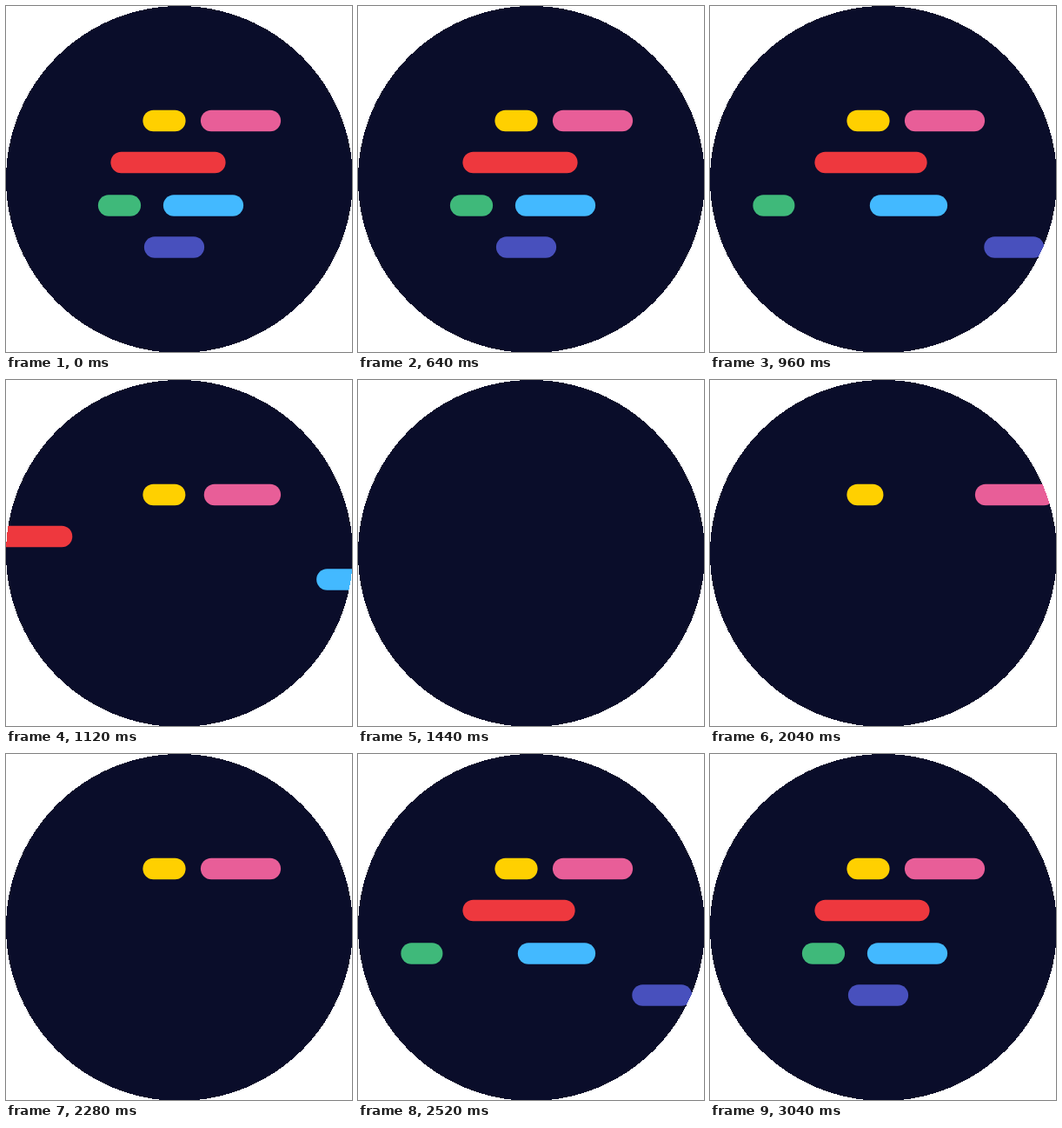
Recreate the animation shown at these times as an HTML page. Size 398x398 px, loop 3080 ms.

```html
<!DOCTYPE html>
<html lang="en">
<head>
<meta charset="utf-8">
<title>Sliding bars</title>
<style>
  html, body { margin: 0; width: 100%; height: 100%; overflow: hidden; background: #fff; }
  svg { display: block; width: 100vw; height: 100vh; }
</style>
</head>
<body>
<svg viewBox="0 0 398 398">
  <rect width="398" height="398" fill="#0a0d2a"/>
  <g id="bars"></g>
  <!-- white surround with a hard-edged round opening -->
  <path d="M-9-9H409V409H-9ZM0 199.5a199.5 199.5 0 0 0 399 0a199.5 199.5 0 0 0-399 0Z"
        fill="#fff" fill-rule="evenodd" shape-rendering="crispEdges"/>
</svg>
<script>
const LOOP = 3080, STEP = 40, MIDDLE = 1640;
const HEIGHT = 24.4, SQUASH = 8, WINDUP = 220, REACH = 176;

// dir: side it leaves by; leave/land: launch and arrival in ms; pace: ms to travel REACH
const bars = [
  { color: '#ffd000', left: 157.4, right: 206.6, y: 132,   dir: -1, leave: 1235, land: 2035, pace: 190 },
  { color: '#e85e98', left: 223.9, right: 316.1, y: 132,   dir: 1,  leave: 1150, land: 2121, pace: 120 },
  { color: '#ee383e', left: 120.4, right: 252.6, y: 180,   dir: -1, leave: 1000, land: 2480, pace: 120 },
  { color: '#3fb97a', left: 105.9, right: 155.1, y: 229.5, dir: -1, leave: 892,  land: 2588, pace: 120 },
  { color: '#43b9ff', left: 180.9, right: 273.1, y: 229.5, dir: 1,  leave: 1000, land: 2480, pace: 120 },
  { color: '#4850bd', left: 158.9, right: 228.1, y: 277.5, dir: 1,  leave: 847,  land: 2633, pace: 120 }
];

const group = document.getElementById('bars');
for (const bar of bars) {
  bar.el = document.createElementNS('http://www.w3.org/2000/svg', 'rect');
  const attrs = { y: bar.y - HEIGHT / 2, height: HEIGHT, rx: HEIGHT / 2, fill: bar.color };
  for (const key in attrs) bar.el.setAttribute(key, attrs[key]);
  group.append(bar.el);
}

// The trailing end winds up before launch and relaxes in flight.
function squash(x) {
  if (x > 0) return SQUASH * Math.exp(-x / 35);
  return SQUASH * Math.max(0, 1 + x / WINDUP) ** 5;
}

function travel(x, pace) {
  return REACH * (Math.max(0, x) / pace) ** 2;
}

function draw(time) {
  for (const bar of bars) {
    const x = time < MIDDLE ? time - bar.leave : bar.land - time;
    const shift = bar.dir * travel(x, bar.pace);
    const tuck = squash(x);
    const left = bar.left + shift + (bar.dir > 0 ? tuck : 0);
    bar.el.setAttribute('x', left.toFixed(2));
    bar.el.setAttribute('width', (bar.right - bar.left - tuck).toFixed(2));
  }
}

const start = performance.now();
function tick() {
  const time = (performance.now() - start) % LOOP;
  draw(Math.floor(time / STEP) * STEP);
  requestAnimationFrame(tick);
}
tick();
</script>
</body>
</html>
```
